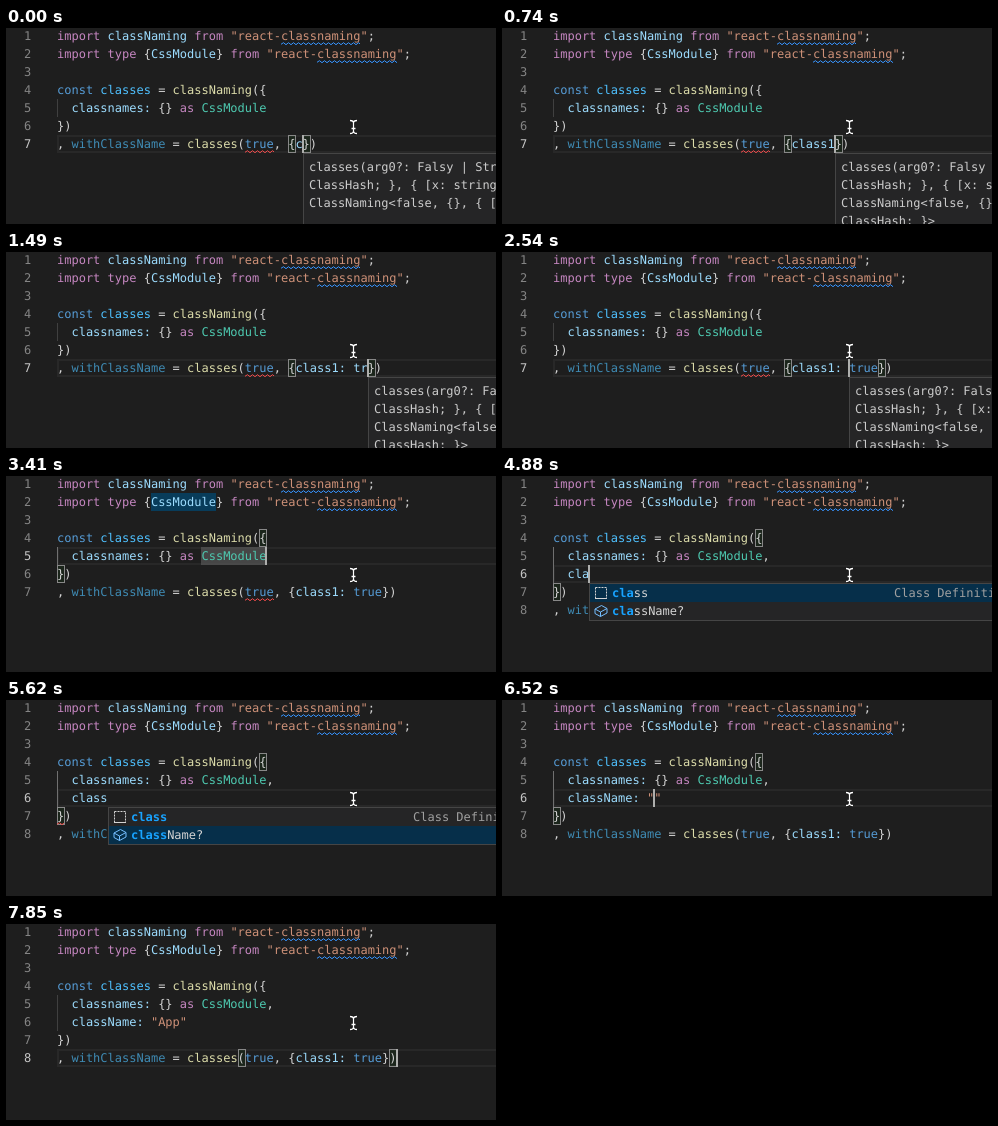
An HTML page for the animation above (8 s loop, 490 px wide and 196 px high).

```html
<!DOCTYPE html>
<html lang="en">
<head>
<meta charset="utf-8">
<title>Typing class names</title>
<style>
html, body { margin: 0; width: 100%; height: 100%; overflow: hidden; background: #1e1e1e; }
#stage {
  position: relative; width: 490px; height: 196px; overflow: hidden;
  background: #1e1e1e; color: #d4d4d4;
  font: 12px/18px "DejaVu Sans Mono", "Liberation Mono", monospace;
  text-rendering: geometricPrecision;
}
#stage * { position: absolute; box-sizing: border-box; white-space: pre; }
#stage svg * { position: static; }
.num { color: #858585; } .num.on { color: #c6c6c6; }
.k { color: #c586c0; } .v { color: #9cdcfe; } .s { color: #ce9178; }
.b { color: #569cd6; } .c { color: #4fc1ff; } .f { color: #dcdcaa; }
.t { color: #4ec9b0; } .u { color: #3f8bb4; } .p { color: #d4d4d4; }
.row { left: 51px; width: 460px; height: 18px; border: 2px solid #282828; }
.guide { left: 51px; width: 1px; background: #404040; }
.guide.on { background: #707070; }
.pair { width: 8px; height: 18px; border: 1px solid #888; background: rgba(0,100,0,.1); }
.mark { height: 18px; }
.caret { width: 2px; height: 18px; background: #aeafad; }
.hint, .list { background: #252526; border: 1px solid #454545; overflow: hidden; }
.hint { width: 440px; height: 90px; color: #ccc; }
.list { width: 432px; height: 38px; }
.item { left: 0; width: 430px; height: 18px; }
.item.on { background: #062f4a; }
.item b { position: static !important; color: #18a3ff; }
</style>
</head>
<body>
<div id="stage"></div>
<script>
const CW = 7.224, LH = 18, LEFT = 51, LOOP = 8000;
const stage = document.getElementById('stage');
const x = col => LEFT + col * CW;
const y = line => (line - 1) * LH - 1;

// Each step changes only the listed fields.
const steps = [
  [0, { arg: 'c', line: 7, col: 34, pair: 'arg', hint: 3, caret: 1, comma: '', extra: null,
        marks: 0, list: 0, pick: 0, badTrue: 1, badEnd: 0 }],
  [150, { arg: 'cl', col: 35, hint: 4 }],
  [300, { arg: 'cla', col: 36 }],
  [450, { arg: 'clas', col: 37 }],
  [590, { arg: 'class', col: 38 }],
  [740, { arg: 'class1', col: 39 }],
  [1040, { arg: 'class1:', col: 40 }],
  [1190, { arg: 'class1: ', col: 41 }],
  [1340, { arg: 'class1: t', col: 42 }],
  [1490, { arg: 'class1: tr', col: 43 }],
  [1640, { arg: 'class1: tru', col: 44 }],
  [1790, { arg: 'class1: true', col: 45 }],
  [2240, { col: 44 }],
  [2390, { col: 42 }],
  [2540, { col: 41 }],
  [2680, { col: 40 }],
  [2830, { col: 39 }],
  [2970, { hint: 0 }],
  [3120, { line: 6, col: 2, pair: 'end' }],
  [3260, { line: 5, col: 29, pair: 'obj' }],
  [3410, { marks: 1 }],
  [3700, { marks: 0, comma: ',', col: 30 }],
  [4000, { extra: '', line: 6, col: 2 }],
  [4450, { caret: 0 }],
  [4590, { caret: 1, extra: 'c', col: 3 }],
  [4740, { extra: 'cla', col: 5, list: 1 }],
  [4890, { extra: 'clas', col: 6 }],
  [5030, { extra: 'class', col: 7 }],
  [5330, { pick: 1 }],
  [5470, { badEnd: 1 }],
  [5620, { caret: 0 }],
  [5770, { caret: 1, extra: 'className', col: 11, list: 0, badEnd: 0 }],
  [6220, { extra: 'className:', col: 12 }],
  [6370, { extra: 'className: ', col: 13, badEnd: 1 }],
  [6520, { extra: 'className: ""', col: 14, badEnd: 0, badTrue: 0 }],
  [6820, { extra: 'className: "A"', col: 15 }],
  [6970, { extra: 'className: "Ap"', col: 16 }],
  [7110, { extra: 'className: "App"', col: 17 }],
  [7560, { line: 7, col: 2, pair: 'end' }],
  [7700, { line: 8, col: 17, pair: '' }],
  [7850, { col: 47, pair: 'call' }]
];

const box = (cls, left, top, body = '', style = '') =>
  `<div class="${cls}" style="left:${left}px;top:${top}px;${style}">${body}</div>`;
const esc = s => s.replace(/</g, '&lt;');

function tokens(src) {
  return (src.match(/"\w*"|\w+:?|\W/g) || []).flatMap(w =>
    [w === 'true' ? 'b' : w[0] === '"' ? 's' : /\w/.test(w) ? 'v' : 'p', w]);
}

function codeLine(line, parts) {
  let out = '', col = 0;
  for (let i = 0; i < parts.length; i += 2) {
    out += box(parts[i], x(col), y(line), esc(parts[i + 1]));
    col += parts[i + 1].length;
  }
  return out;
}

function wave(line, from, to, color) {
  const w = (to - from) * CW;
  let d = 'M0 2.3';
  for (let i = 1; i * 2 < w + 2; i++) d += `L${i * 2.5} ${i % 2 ? 0.7 : 2.7}`;
  return `<svg width="${w}" height="4" style="left:${x(from)}px;top:${y(line) + 15}px;overflow:hidden">
    <path d="${d}" fill="none" stroke="${color}"/></svg>`;
}

function source(s) {
  const doc = [
    ['k', 'import ', 'v', 'classNaming ', 'k', 'from ', 's', '"react-classnaming"', 'p', ';'],
    ['k', 'import ', 'k', 'type ', 'p', '{', 'v', 'CssModule', 'p', '} ', 'k', 'from ',
      's', '"react-classnaming"', 'p', ';'],
    [],
    ['b', 'const ', 'c', 'classes ', 'p', '= ', 'f', 'classNaming', 'p', '({'],
    ['p', '  ', 'v', 'classnames:', 'p', ' {} ', 'k', 'as ', 't', 'CssModule', 'p', s.comma],
    ['p', '})'],
    ['p', ', ', 'u', 'withClassName', 'p', ' = ', 'f', 'classes', 'p', '(', 'b', 'true',
      'p', ', {', ...tokens(s.arg), 'p', '})']
  ];
  if (s.extra !== null) doc.splice(5, 0, ['p', '  ', ...tokens(s.extra)]);
  return doc;
}

function hint(s) {
  const text = ['classes(arg0?: Falsy | String', 'ClassHash; }, { [x: string]: ',
    'ClassNaming<false, {}, { [x: ', 'ClassHash; }>'];
  const rows = text.slice(0, s.hint).map((r, i) => box('', 5, 4 + i * LH, esc(r)));
  return box('hint', Math.round(x(s.col)), y(s.line + 1), rows.join(''));
}

function list(s) {
  const snippet = `<svg width="14" height="14" style="left:4px;top:2px">
    <rect x="1.5" y="1.5" width="11" height="11" fill="none" stroke="#d4d4d4" stroke-dasharray="2 1"/>
    <path d="M1 12.5h12" stroke="#d4d4d4"/></svg>`;
  const field = `<svg width="14" height="14" style="left:4px;top:2px">
    <path d="M1 5L7.5 1.5L13 4.5V9L6.5 12.5L1 9.5ZM1 5L6.5 8L13 4.5M6.5 8V12.5"
      fill="none" stroke="#75beff"/></svg>`;
  const item = (i, body) => box('item' + (s.pick === i ? ' on' : ''), 0, i * LH, body);
  const typed = s.extra;
  const label = word => box('', 22, 0, `<b>${typed}</b>${word.slice(typed.length)}`);
  return box('list', Math.round(x(s.col)), y(s.line + 1),
    item(0, snippet + label('class') +
      box('', 304, 0, 'Class Definition', 'color:#a0a0a0')) +
    item(1, field + label('className?')));
}

function pointer() {
  const d = 'M344 92.5Q347.5 92.5 347.5 95Q347.5 92.5 351 92.5M347.5 95V103' +
    'M344 105.5Q347.5 105.5 347.5 103Q347.5 105.5 351 105.5M345.5 100.5H349.5';
  return `<svg width="490" height="196" style="left:0;top:0" fill="none">
    <path d="${d}" stroke="#111" stroke-width="3"/><path d="${d}" stroke="#fff" stroke-width="1.3"/></svg>`;
}

function render(s) {
  const doc = source(s), last = doc.length, end = last - 1;
  const pairs = {
    arg: [[last, 32], [last, 33 + s.arg.length]],
    obj: [[4, 28], [end, 0]],
    end: [[4, 27], [end, 1]],
    call: [[last, 25], [last, 46]]
  }[s.pair] || [];
  let out = box('row', LEFT, y(s.line));
  out += box('guide' + (s.pair === 'obj' ? ' on' : ''), LEFT, y(5), '', `height:${(end - 5) * LH}px`);
  if (s.marks) {
    const wide = `width:${9 * CW}px;background:`;
    out += box('mark', x(13), y(2), '', wide + 'rgba(0,73,114,.72)');
    out += box('mark', x(20), y(5), '', wide + 'rgba(87,87,87,.72)');
  }
  for (const [line, col] of pairs) out += box('pair', Math.round(x(col)), y(line));
  doc.forEach((parts, i) => {
    out += box('num' + (i + 1 === s.line ? ' on' : ''), 18, y(i + 1), i + 1);
    out += codeLine(i + 1, parts);
  });
  out += wave(1, 31, 42, '#3794ff') + wave(2, 36, 47, '#3794ff');
  if (s.badTrue) out += wave(last, 26, 30, '#f14c4c');
  if (s.badEnd) out += wave(end, 0, 1, '#f14c4c');
  if (s.caret) out += box('caret', Math.round(x(s.col)) - 1, y(s.line));
  if (s.hint) out += hint(s);
  if (s.list) out += list(s);
  stage.innerHTML = out + pointer();
}

let shown = -1;
function tick() {
  const t = performance.now() % LOOP;
  const n = steps.filter(step => step[0] <= t).length;
  if (n !== shown) {
    shown = n;
    render(Object.assign({}, ...steps.slice(0, n).map(step => step[1])));
  }
  requestAnimationFrame(tick);
}
tick();
</script>
</body>
</html>
```
